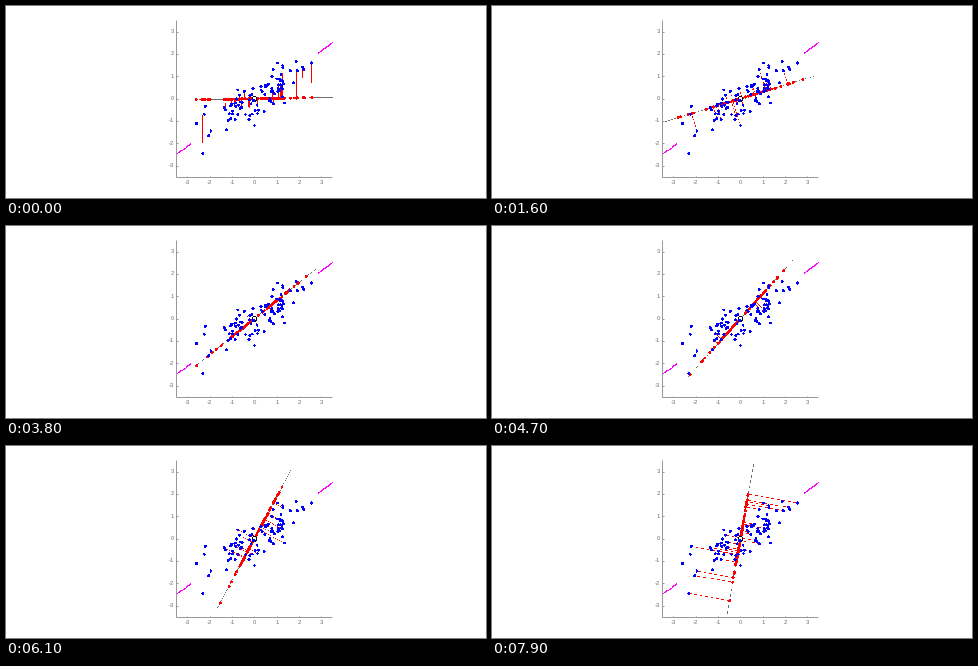
A matplotlib script for the animation above (8 s loop, 480 by 192 pixels).

```python
import numpy as np
import matplotlib.pyplot as plt
from matplotlib.animation import FuncAnimation

W, H = 480, 192
K = 0.48                                  # stage pixels per fine pixel
FW, FH = 1000, 400
CENTER = np.array([517.5, 193.0])         # plot origin on the fine grid
UNIT = 326 / 7                            # fine pixels per data unit
REACH = 3.5 * UNIT

RED, BLUE, MAGENTA = (255, 0, 0), (0, 0, 255), (255, 0, 255)
GRAY, BLACK, WHITE = (110, 110, 110), (0, 0, 0), (255, 255, 255)

# The few samples far from the cloud, in data units.
FAR = [(-2.6, -1.1), (-2.2, -0.35), (-2.25, -0.7), (-2.3, -2.45),
       (-2.05, -1.65), (-1.95, -1.45), (-1.25, -1.4), (1.05, 1.6),
       (0.85, 1.3), (1.6, 1.25), (1.75, 0.7), (1.87, 1.67), (1.93, 1.25),
       (2.15, 1.4), (2.2, 1.3), (2.55, 1.6), (1.35, -0.2), (0.0, -1.2)]


def make_points(n=74):
    rng = np.random.default_rng(12)
    x = rng.uniform(-1.35, 1.4, n)
    y = 0.55 * x + np.clip(rng.normal(0, 0.42, n), -0.8, 0.8)
    cloud = np.vstack([FAR, np.column_stack([x, y])])
    return cloud * (UNIT, -UNIT)


def direction(deg):
    a = np.radians(deg)
    return np.array([np.cos(a), -np.sin(a)])


def line(img, p, q, color, width=1):
    p, q = p + CENTER, q + CENTER
    n = int(np.abs(q - p).max()) + 2
    x, y = np.floor(np.linspace(p, q, n)).astype(int).T
    for d in range(width):
        img[y + d - width // 2, x] = color


def disc(img, p, r, color):
    x, y = p + CENTER
    x0, y0 = int(x - r), int(y - r)
    size = int(2 * r) + 3
    box = img[y0:y0 + size, x0:x0 + size]
    yy, xx = np.mgrid[:size, :size]
    box[(xx + x0 + 0.5 - x) ** 2 + (yy + y0 + 0.5 - y) ** 2 <= r * r] = color


points = make_points()
cols = ((np.arange(W) + 0.5) / K).astype(int)
rows = ((np.arange(H) + 0.5) / K).astype(int)
main_axis = direction(35.5)


def render(i):
    angle = i + 1
    w = direction(angle)
    proj = np.outer(points @ w, w)
    img = np.full((FH, FW, 3), 255, np.uint8)

    line(img, -REACH * w, REACH * w, GRAY)
    for s in (-1, 1):
        line(img, s * REACH * main_axis, s * REACH / main_axis[0] * main_axis,
             MAGENTA, 3)

    # Hairlines survive best when short and close to an axis direction.
    length = np.linalg.norm(points - proj, axis=1)
    chance = 0.6 * abs(np.cos(np.radians(2 * angle))) * np.exp(-length / 80)
    shown = np.random.default_rng(i).random(len(points)) < chance
    for p, q in zip(points[shown], proj[shown]):
        line(img, p, q, RED)

    for q in proj:
        disc(img, q, 3.1, RED)
    disc(img, np.zeros(2), 6, BLACK)
    disc(img, np.zeros(2), 4, WHITE)
    for p in points:
        disc(img, p, 3.1, BLUE)
    return img[np.ix_(rows, cols)]


fig = plt.figure(figsize=(W / 100, H / 100), dpi=100, facecolor="white")
ax = fig.add_axes([0, 0, 1, 1])
ax.axis("off")
picture = ax.imshow(render(0), extent=(0, W, H, 0), interpolation="nearest",
                    aspect="auto")
ax.set(xlim=(0, W), ylim=(H, 0))

pen = dict(color="0.6", lw=0.72, solid_capstyle="butt")
ax.plot([170, 170], [14, 171], **pen)
ax.plot([170, 326], [171, 171], **pen)
font = dict(family="Liberation Sans", size=4.3, color="0.45")
for v in range(-3, 4):
    x = (CENTER[0] + v * UNIT) * K
    y = (CENTER[1] - v * UNIT) * K
    ax.plot([x, x], [169.5, 171], **pen)
    ax.plot([170, 171.5], [y, y], **pen)
    ax.text(x, 176, str(v), ha="center", va="center", **font)
    ax.text(168, y, str(v), ha="right", va="center", **font)


def update(i):
    picture.set_data(render(i))
    return (picture,)


anim = FuncAnimation(fig, update, frames=80, interval=100, repeat=True)
plt.show()
```
